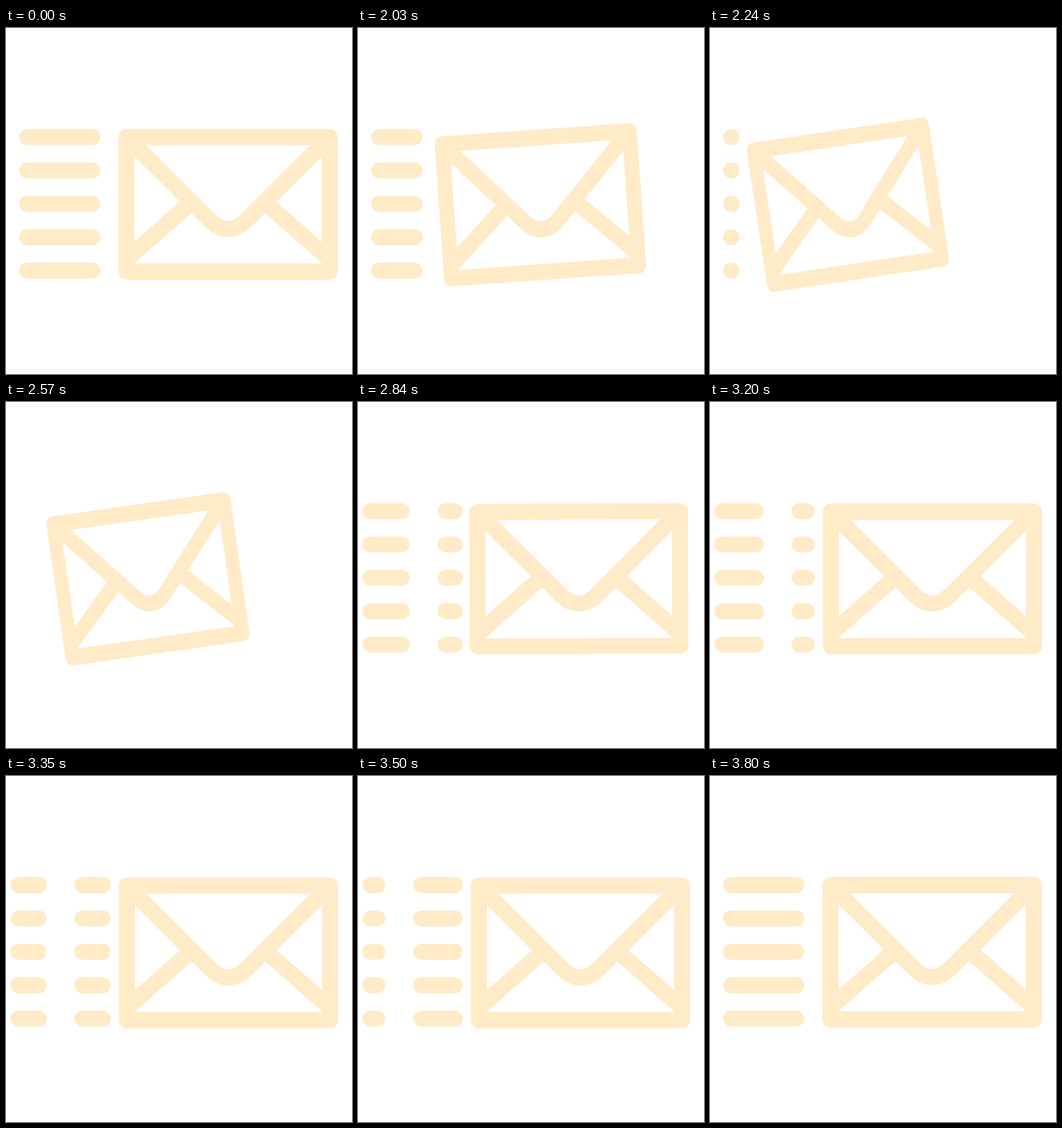
Write an HTML page that moves like this. It is 400 px wide and 400 px high and loops after 3.83 s.

```html
<!DOCTYPE html>
<html lang="en">
<head>
<meta charset="utf-8">
<title>Sending mail</title>
<style>
  html, body { margin: 0; width: 100%; height: 100%; overflow: hidden; background: #fff; }
  svg { display: block; width: 100%; height: 100%; }
</style>
</head>
<body>
<svg viewBox="0 0 400 400" fill="none" stroke="#ffebc8" stroke-width="18.6" stroke-linejoin="round">
  <path id="streaks" stroke-linecap="round"/>
  <g id="envelope">
    <rect x="139.3" y="126.1" width="235" height="155.5"/>
    <path d="M139.3 126.1L237 223.6Q246 232.4 256.8 232.4T276.6 223.6L374.3 126.1"/>
    <path d="M139.3 267.6L208 207M374.3 267.6L305.6 207"/>
  </g>
</svg>
<script>
const LOOP = 3830, START = 2030, STEP = 30, LAST = 59;
const CX = 256.8, CY = 203.8;
const HIDE_STREAKS = 8, SHOW_DASHES = 23;
const TRACK = 97.5, DASH = 47, DASH_SPEED = 16.45;
const streaks = document.getElementById('streaks');
const envelope = document.getElementById('envelope');

const expoInOut = u =>
  u <= 0 ? 0 : u >= 1 ? 1 : u < .5 ? 2 ** (20 * u - 11) : 1 - 2 ** (9 - 20 * u);

// Five parallel horizontal lines
function setStreaks(x, length, dash = 'none', offset = 0) {
  let d = '';
  for (let row = 0; row < 5 && length > 0; row++) d += `M${x} ${126.1 + 38.6 * row}h${length}`;
  streaks.setAttribute('d', d);
  streaks.setAttribute('stroke-dasharray', dash);
  streaks.setAttribute('stroke-dashoffset', offset);
}

// pull: 0 is at rest, 1 is drawn back, tilted and squeezed
function setEnvelope(pull, dx = 0, dy = 0) {
  envelope.setAttribute('transform',
    `translate(${CX + dx - 93 * pull} ${CY + dy}) rotate(${-8.1 * pull}) ` +
    `scale(${1 - .153 * pull} 1) translate(${-CX} ${-CY})`);
}

function draw(time) {
  const i = Math.floor((time % LOOP - START) / STEP);
  if (i < 0 || i >= LAST) {
    setStreaks(24.3, 75.5);
    setEnvelope(0);
    return;
  }
  const left = .549 ** i;
  const back = 1.06 * (1 - .53 * left);
  setEnvelope(back * (1 - expoInOut((i - 10.1) / 23.1)), .4, .5);

  if (i < HIDE_STREAKS) setStreaks(24.3, 41.2 * left);
  else if (i < SHOW_DASHES) setStreaks(0, 0);
  else {
    const shift = (89.2 + DASH_SPEED * (i - 39) + 4 * TRACK) % TRACK;
    setStreaks(14.3, TRACK, `${DASH} ${TRACK - DASH}`, -shift);
  }
}

const begin = performance.now();
function tick() {
  draw(performance.now() - begin);
  requestAnimationFrame(tick);
}
tick();
</script>
</body>
</html>
```
